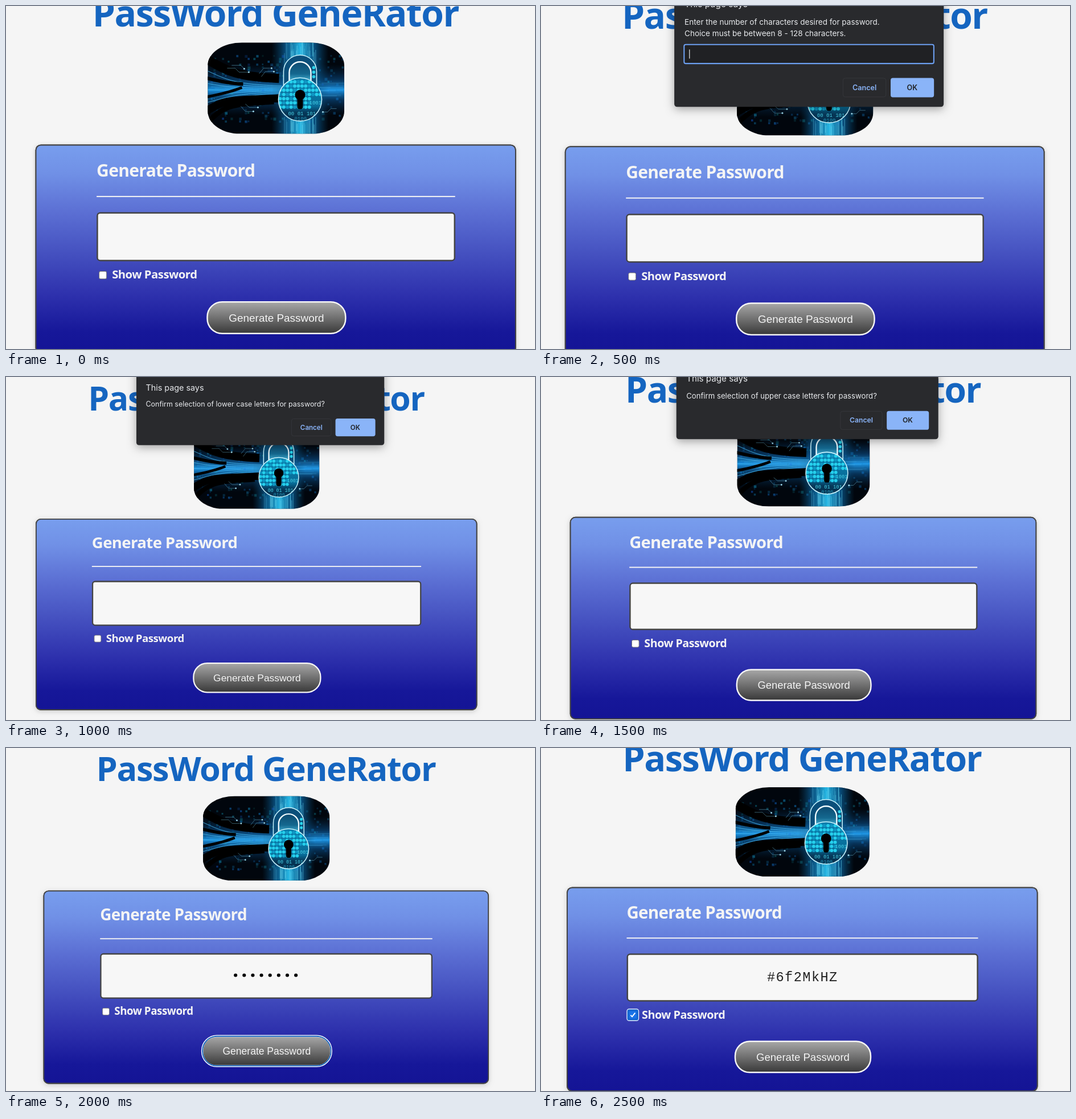
Recreate the animation shown at these times as an HTML page with a canvas. Size 929 by 603 pixels, loop 3 s.

```html
<!DOCTYPE html>
<html lang="en">
<head>
<meta charset="utf-8">
<title>Password generator</title>
<style>
  html, body { margin: 0; width: 100%; height: 100%; overflow: hidden; background: #f5f5f5; }
  canvas { display: block; width: 929px; height: 603px; }
</style>
</head>
<body>
<canvas id="stage" width="929" height="603"></canvas>
<script>
const ctx = document.getElementById('stage').getContext('2d');
const STEP = 500;
const HEAD_FONT = '"Open Sans", "Noto Sans", sans-serif';
const UI_FONT = 'Inter, Roboto, sans-serif';
const PAPER = '#f5f5f5';

// x, y: top left corner of the card; s: zoom of the page
const scenes = [
  { x: 51.5, y: 243.4, s: 1.001 },
  { x: 41.8, y: 246.3, s: 0.999, prompt: true, lines: [
    'Enter the number of characters desired for password.',
    'Choice must be between 8 - 128 characters.'] },
  { x: 52, y: 249, s: 0.9193, lines: ['Confirm selection of lower case letters for password?'] },
  { x: 50.7, y: 245.8, s: 0.9715, lines: ['Confirm selection of upper case letters for password?'] },
  { x: 65.5, y: 250.5, s: 0.9276, masked: true, focused: true },
  { x: 45, y: 244.5, s: 0.981, password: '#6f2MkHZ', checked: true }
];

function randomizer(seed) {
  return () => (seed = (seed * 16807) % 2147483647) / 2147483647;
}

function gradient(x0, y0, x1, y1, stops) {
  const g = ctx.createLinearGradient(x0, y0, x1, y1);
  stops.forEach(([at, color]) => g.addColorStop(at, color));
  return g;
}

function box(x, y, w, h, r, fill, stroke, line = 1) {
  ctx.beginPath();
  ctx.roundRect(x, y, w, h, r);
  if (fill) { ctx.fillStyle = fill; ctx.fill(); }
  if (stroke) { ctx.strokeStyle = stroke; ctx.lineWidth = line; ctx.stroke(); }
}

function disc(x, y, r, fill) {
  ctx.beginPath();
  ctx.arc(x, y, r, 0, Math.PI * 2);
  ctx.fillStyle = fill;
  ctx.fill();
}

function path(d, stroke, line) {
  ctx.strokeStyle = stroke;
  ctx.lineWidth = line;
  ctx.stroke(new Path2D(d));
}

function text(str, x, y, font, color, align = 'left', spacing = 0) {
  ctx.font = font;
  ctx.letterSpacing = spacing + 'px';
  ctx.fillStyle = color;
  ctx.textAlign = align;
  ctx.fillText(str, x, y);
}

function headText(str, x, y, size, color, align) {
  text(str, x, y, `700 ${size}px ${HEAD_FONT}`, color, align, size * -0.023);
}

function drawBackdrop(rand) {
  ctx.fillStyle = '#01060d';
  ctx.fillRect(0, 0, 240, 160);
  ctx.fillStyle = gradient(0, 38, 0, 128, [
    [0, '#06305500'], [0.3, '#0a4f8a99'], [0.5, '#1c93e2'], [0.7, '#0a4f8a99'], [1, '#06305500']]);
  ctx.fillRect(0, 38, 240, 90);
  ctx.fillStyle = gradient(112, 0, 212, 0, [
    [0, '#06466e00'], [0.25, '#0a5f98cc'], [0.5, '#24b4e2'], [0.75, '#0a5f98cc'], [1, '#06466e00']]);
  ctx.fillRect(112, 0, 100, 160);

  for (let i = 0; i < 230; i++) {
    const size = 2 + rand() * 3;
    ctx.fillStyle = `rgba(20,${90 + rand() * 70},${150 + rand() * 70},${0.12 + rand() * 0.35})`;
    ctx.fillRect(Math.floor(rand() * 48) * 5, 22 + Math.floor(rand() * 24) * 5, size, size);
  }
  for (let i = 0; i < 34; i++) {
    const x = 134 + rand() * 56;
    ctx.fillStyle = `rgba(110,225,250,${0.15 + rand() * 0.4})`;
    ctx.fillRect(x, rand() * 30 - 10, 1, 30);
    ctx.fillRect(x, 125 + rand() * 20, 1, 30);
  }
  for (let i = 0; i < 24; i++) {
    ctx.fillStyle = `rgba(80,190,245,${0.15 + rand() * 0.3})`;
    ctx.fillRect(rand() * 200, 70 + rand() * 24, 50, 0.8);
  }
}

function drawCables() {
  for (let i = 0; i < 7; i++) {
    path(`M0 ${50 + i * 11}C35 ${66 + i * 6} 50 ${74 + i * 3} 130 ${76 + i * 2.2}`, '#48b8ee', 0.9);
  }
  path('M-4 28C35 50 48 60 125 63', '#000', 16);
  path('M-4 122C30 97 52 102 125 98', '#000', 14);
  path('M-4 146C28 105 52 109 116 104', '#000', 9);
  path('M-4 62Q36 72 62 73', '#000', 6);
  path('M-4 96Q38 88 60 79', '#000', 5);
  const traces = [
    'M34 45H48L55 52H72', 'M42 40H58L64 46', 'M90 55L98 45H112',
    'M94 60L101 51H116', 'M58 112L66 121H80', 'M66 108L73 114H88', 'M202 122H210L216 116H226'];
  traces.forEach(d => path(d, '#6bb6d2aa', 0.8));
  [[72, 52], [64, 46], [112, 45], [116, 51], [80, 121], [88, 114], [202, 122]]
    .forEach(([x, y]) => disc(x, y, 1.5, '#9bd5e8'));
}

function drawPadlock() {
  const arch = 'M133 76V51A29 29 0 0 1 191 51V76';
  const inner = 'M143 69V53A19 19 0 0 1 181 53V69Q162 58 143 69Z';
  ctx.fillStyle = '#0b4f7a';
  ctx.fill(new Path2D(arch));
  ctx.fillStyle = gradient(0, 34, 0, 69, [[0, '#0d4a70'], [0.6, '#14688f'], [1, '#49b6d8']]);
  ctx.fill(new Path2D(inner));
  path(arch, '#c8f2fc', 1.6);
  path(inner, '#f2fcff', 2.4);

  ctx.save();
  ctx.beginPath();
  ctx.arc(162, 100, 38, 0, Math.PI * 2);
  ctx.clip();
  ctx.fillStyle = gradient(0, 62, 0, 138, [[0, '#0a7fae'], [0.65, '#086c98'], [0.8, '#06395a'], [1, '#052c48']]);
  ctx.fillRect(124, 62, 76, 76);
  for (let row = 0; row < 7; row++) {
    for (let col = 0; col < 12; col++) {
      if (row > 3 && col > 8) continue;
      const bright = (row * 5 + col * 3) % 7 > 1;
      disc(127 + col * 6.4, 69 + row * 7.4, 3, bright ? '#25cfec' : '#0f97c4');
    }
  }
  const digits = '9px "Liberation Mono", monospace';
  text('00 01 101', 141, 128, digits, '#47d4e9');
  text('0100', 152, 137, digits, '#2499bd');
  text('1001', 178, 109, digits, '#47d4e9');
  ctx.restore();
  path('M124 100a38 38 0 1 0 76 0a38 38 0 1 0 -76 0Z', '#c8f2fc', 1.6);
  [44, 52, 60].forEach(y => disc(186, y, 2.8, '#2bd3ea'));
  disc(162, 92, 9, '#000');
  box(157, 94, 10, 23, 4, '#000');
}

function drawPicture() {
  ctx.save();
  ctx.translate(302.5, -179);
  ctx.beginPath();
  ctx.roundRect(0, 0, 239.5, 161, { x: 60, y: 40 });
  ctx.clip();
  drawBackdrop(randomizer(77));
  drawCables();
  drawPadlock();
  ctx.restore();
}

function drawCheckbox(checked) {
  if (!checked) {
    box(112, 223, 13, 13, 2.5, '#fff', '#767676', 1);
    return;
  }
  box(108, 218.5, 21, 21, 4, '#1467d2', '#fff', 1.2);
  box(112, 222.5, 13, 13, 2.5, '#1a73e8');
  path('M114.5 229.5L117.3 232.3L122.7 225.5', '#fff', 2);
}

function drawButton(focused) {
  const fill = gradient(0, 276, 0, 333, [[0, '#a9a9a9'], [0.5, '#707070'], [1, '#363636']]);
  box(301.7, 276.5, 242.6, 55.6, 26, fill, PAPER, 2.5);
  if (focused) {
    box(301.4, 276.2, 243.2, 56.2, 27, null, '#1565c0', 2.2);
    box(299.7, 274.5, 246.6, 59.6, 29, null, '#fff', 1.4);
  }
  text('Generate Password', 423, 311, '18.9px "Liberation Sans", Arial, sans-serif', PAPER, 'center');
}

function shadowed(color, blur, dy, draw) {
  ctx.save();
  ctx.shadowColor = color;
  ctx.shadowBlur = blur;
  ctx.shadowOffsetY = dy;
  draw();
  ctx.restore();
}

function drawCard({ masked, password, checked, focused }) {
  const blue = gradient(0, 0, 0, 366, [
    [0, '#789eee'], [0.14, '#7090e6'], [0.32, '#5c70d4'], [0.52, '#4551c0'],
    [0.72, '#2e31ad'], [0.9, '#161799'], [1, '#141495']]);
  shadowed('rgba(0,0,0,.18)', 8, 2, () => box(0, 0, 843.6, 366.5, 10, '#444'));
  box(1, 1, 841.6, 364.5, 9, blue, '#444', 2);

  headText('Generate Password', 107.5, 57, 30, PAPER);
  ctx.fillStyle = PAPER;
  ctx.fillRect(107.5, 90.4, 629, 2);
  box(108.8, 120.2, 626.8, 83.6, 5, '#f7f7f7', '#444', 2.5);
  if (masked) {
    for (let i = 0; i < 8; i++) disc(364 + i * 16.32, 160.6, 3.3, '#000');
  }
  if (password) {
    text(password, 422.3, 168.5, '24px "Liberation Mono", "Courier New", monospace', '#222', 'center', 1.5);
  }
  drawCheckbox(checked);
  headText('Show Password', 134.5, 235.6, 20.2, PAPER);
  drawButton(focused);
}

function drawDialog({ lines, prompt }) {
  const bottom = prompt ? -69 : -140.5;
  const buttonTop = bottom - 51;
  shadowed('rgba(0,0,0,.35)', 16, 4, () => box(192.5, -290, 473.5, bottom + 290, 5, '#292a2d'));
  text('This page says', 210.5, -244.3, `15.6px ${UI_FONT}`, '#e8eaed');
  lines.forEach((line, i) => text(line, 210.5, -214 + i * 21, `13.55px ${UI_FONT}`, '#e8eaed'));
  if (prompt) {
    box(209.7, -178.8, 439, 33.5, 3, '#202124', '#6c9ff0', 2.1);
    ctx.fillStyle = '#e8eaed';
    ctx.fillRect(218.6, -170, 1.2, 16);
  }
  box(489, buttonTop + 0.5, 75.5, 33, 4, null, '#36373b', 1);
  box(572.8, buttonTop, 76.2, 34, 4, '#8ab4f8');
  const label = `600 12.6px ${UI_FONT}`;
  text('Cancel', 526.8, buttonTop + 21.3, label, '#8ab4f8', 'center');
  text('OK', 610.6, buttonTop + 21.3, label, '#202124', 'center');
}

function drawScene(scene) {
  ctx.setTransform(1, 0, 0, 1, 0, 0);
  ctx.fillStyle = PAPER;
  ctx.fillRect(0, 0, 929, 603);
  ctx.setTransform(scene.s, 0, 0, scene.s, scene.x, scene.y);
  headText('PassWord GeneRator', 421.5, -207, 64, '#1565c0', 'center');
  drawPicture();
  drawCard(scene);
  if (scene.lines) drawDialog(scene);
}

let start;
function tick(now) {
  start ??= now;
  drawScene(scenes[Math.floor((now - start) / STEP) % scenes.length]);
  requestAnimationFrame(tick);
}
requestAnimationFrame(tick);
</script>
</body>
</html>
```
